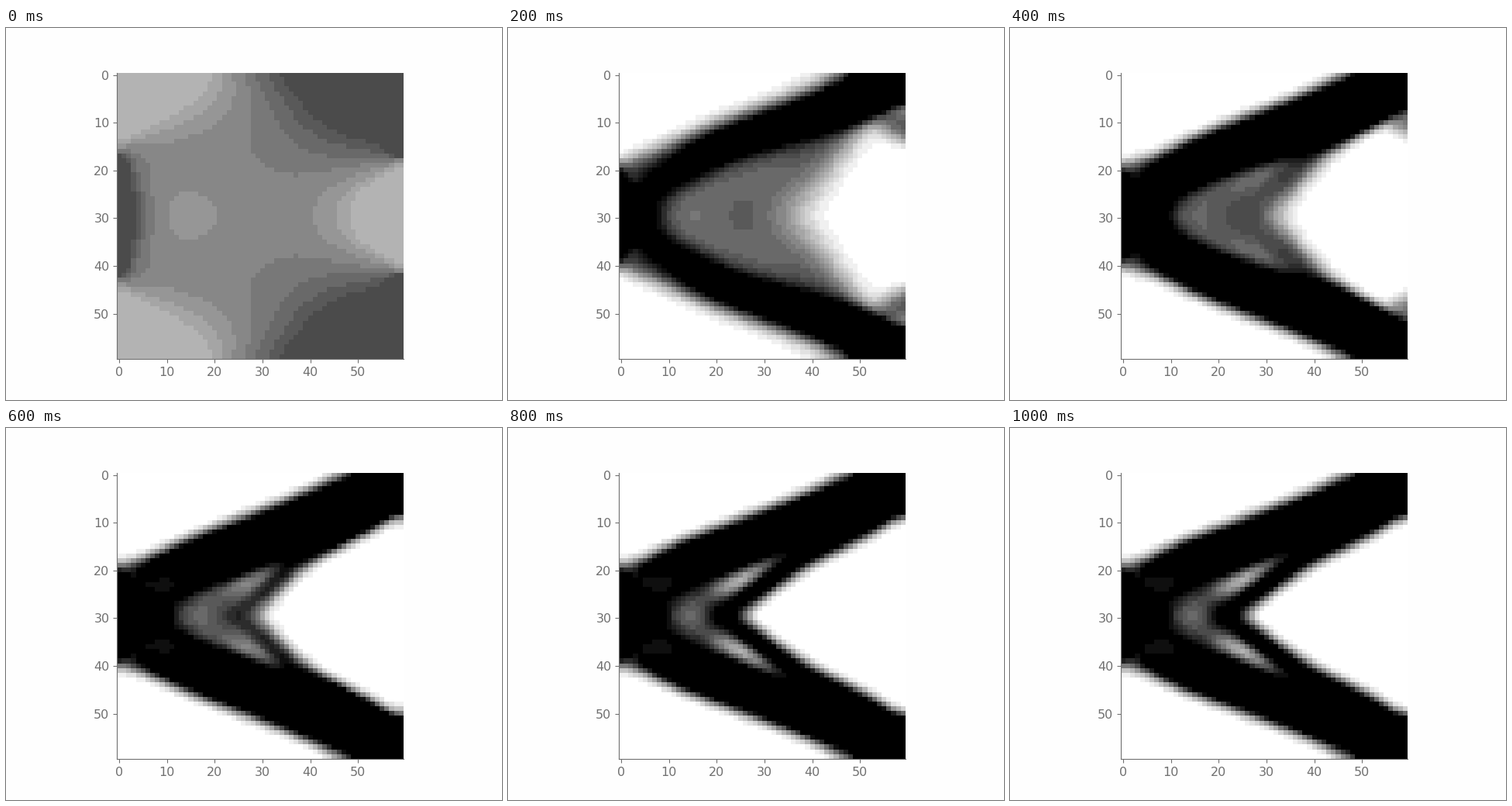
Animation, 640 px wide and 480 px high, one loop 1200 ms. Source, as a matplotlib script:

```python
import numpy as np
import matplotlib.pyplot as plt
from matplotlib.animation import FuncAnimation

# Topology optimisation of a square cantilever (SIMP with optimality criteria).
# Left edge: vertical load on the middle third. Right edge: outer quarters fixed.
# The design is symmetric, so only the upper half is solved.
N = 60
HALF = N // 2
VOLUME, PENALTY, MOVE, RADIUS = 0.5, 3.0, 0.2, 3.0
E_MIN, X_MIN = 1e-6, 1e-3
LOAD_START, SUPPORT_END = N // 3, N // 4
M = 2 * (HALF + 1)                     # unknowns per column of nodes
FRONTS = (39, 34, 31, 27, 25)          # web length at which a design is kept
MAX_STEPS = 90


def element_stiffness(nu=0.3):
    """Bilinear plane-stress square, nodes in counter-clockwise order."""
    g = 1 / np.sqrt(3)
    elastic = np.array([[1, nu, 0], [nu, 1, 0], [0, 0, (1 - nu) / 2]])
    sx, sy = np.array([-1, 1, 1, -1]), np.array([-1, -1, 1, 1])
    total = np.zeros((8, 8))
    for px in (-g, g):
        for py in (-g, g):
            dx, dy = sx * (1 + sy * py) / 2, sy * (1 + sx * px) / 2
            strain = np.zeros((3, 8))
            strain[0, 0::2] = strain[2, 1::2] = dx
            strain[1, 1::2] = strain[2, 0::2] = dy
            total += strain.T @ elastic @ strain / 4
    return total / (1 - nu**2)


KE = element_stiffness()
rows = 2 * np.arange(HALF)[:, None]
LOCAL = rows + np.array([2, 3, M + 2, M + 3, M, M + 1, 0, 1])


def strain_energy(x):
    """Solve the strip-wise block tridiagonal system; energy per unit modulus."""
    modulus = E_MIN + x**PENALTY * (1 - E_MIN)
    strips = np.zeros((N, 2 * M, 2 * M))
    for a in range(8):
        for b in range(8):
            strips[:, LOCAL[:, a], LOCAL[:, b]] += modulus * KE[a, b]
    for d in (M - 2, 2 * M - 2):       # no horizontal motion on the mid line
        strips[:, d, d] += 1e4

    force = np.zeros(M)
    force[2 * LOAD_START + 1::2] = 1
    force[-1] = 0.5
    carry = np.zeros((M, M))
    steps = []
    for s in strips:
        rhs = np.column_stack([s[:M, M:], force])
        sol = np.linalg.solve(carry + s[:M, :M], rhs)
        steps.append(sol)
        carry = s[M:, M:] - s[M:, :M] @ sol[:, :M]
        force = -s[M:, :M] @ sol[:, M]

    u = np.zeros((N + 1, M))
    free = slice(2 * (SUPPORT_END + 1), M)
    u[N, free] = np.linalg.solve(carry[free, free], force[free])
    for i in range(N - 1, -1, -1):
        u[i] = steps[i][:, M] - steps[i][:, :M] @ u[i + 1]
    ue = np.hstack([u[:-1], u[1:]])[:, LOCAL]
    return np.einsum("cra,ab,crb->cr", ue, KE, ue)


def mirror(a):
    return np.hstack([a, a[:, ::-1]])


def cone_sum(a):
    """Sum over neighbours, weighted by a cone of the filter radius."""
    reach = int(np.ceil(RADIUS))
    padded = np.pad(mirror(a), reach)
    total = np.zeros((N, N))
    for i in range(-reach, reach + 1):
        for j in range(-reach, reach + 1):
            weight = RADIUS - np.hypot(i, j)
            if weight > 0:
                total += weight * padded[reach + i:reach + i + N,
                                         reach + j:reach + j + N]
    return total[:, :HALF]


CONE_TOTAL = cone_sum(np.ones((N, HALF)))


def update(x):
    gain = PENALTY * x**(PENALTY - 1) * strain_energy(x)
    gain = cone_sum(x * gain) / (CONE_TOTAL * x)
    gain = np.maximum(gain / gain.mean(), 0)
    low, high = 1e-9, 1e9
    while high / low > 1.0001:
        mid = np.sqrt(low * high)
        new = np.clip(x * np.sqrt(gain / mid),
                      np.maximum(X_MIN, x - MOVE), np.minimum(1, x + MOVE))
        if new.mean() > VOLUME:
            low = mid
        else:
            high = mid
    return new


def web_front(x):
    """Right end of the material on the mid line."""
    return np.flatnonzero(x[:, -1] > 0.25).max() + 1


def run():
    x = update(np.full((N, HALF), VOLUME))
    designs = [x]
    for _ in range(MAX_STEPS):
        x = update(x)
        if web_front(x) <= FRONTS[len(designs) - 1]:
            designs.append(x)
            if len(designs) > len(FRONTS):
                return designs
    return designs + [x] * (len(FRONTS) + 1 - len(designs))


designs = [mirror(x).T for x in run()]

INK = "#707070"
fig, ax = plt.subplots(figsize=(6.4, 4.8), dpi=100, facecolor="#fefefe")
image = ax.imshow(-designs[0], cmap=plt.get_cmap("gray", 18), vmin=-1, vmax=0,
                  interpolation="nearest")
ax.set_xticks(range(0, N, 10))
ax.set_yticks(range(0, N, 10))
ax.tick_params(color=INK, labelcolor=INK, labelsize=11.5,
               labelfontfamily="DejaVu Sans")
ax.spines[["top", "right"]].set_visible(False)
ax.spines[["left", "bottom"]].set_color(INK)


def draw(i):
    image.set_data(-designs[i])
    return [image]


anim = FuncAnimation(fig, draw, frames=len(designs), interval=200,
                     repeat=True, repeat_delay=0)
plt.show()
```
